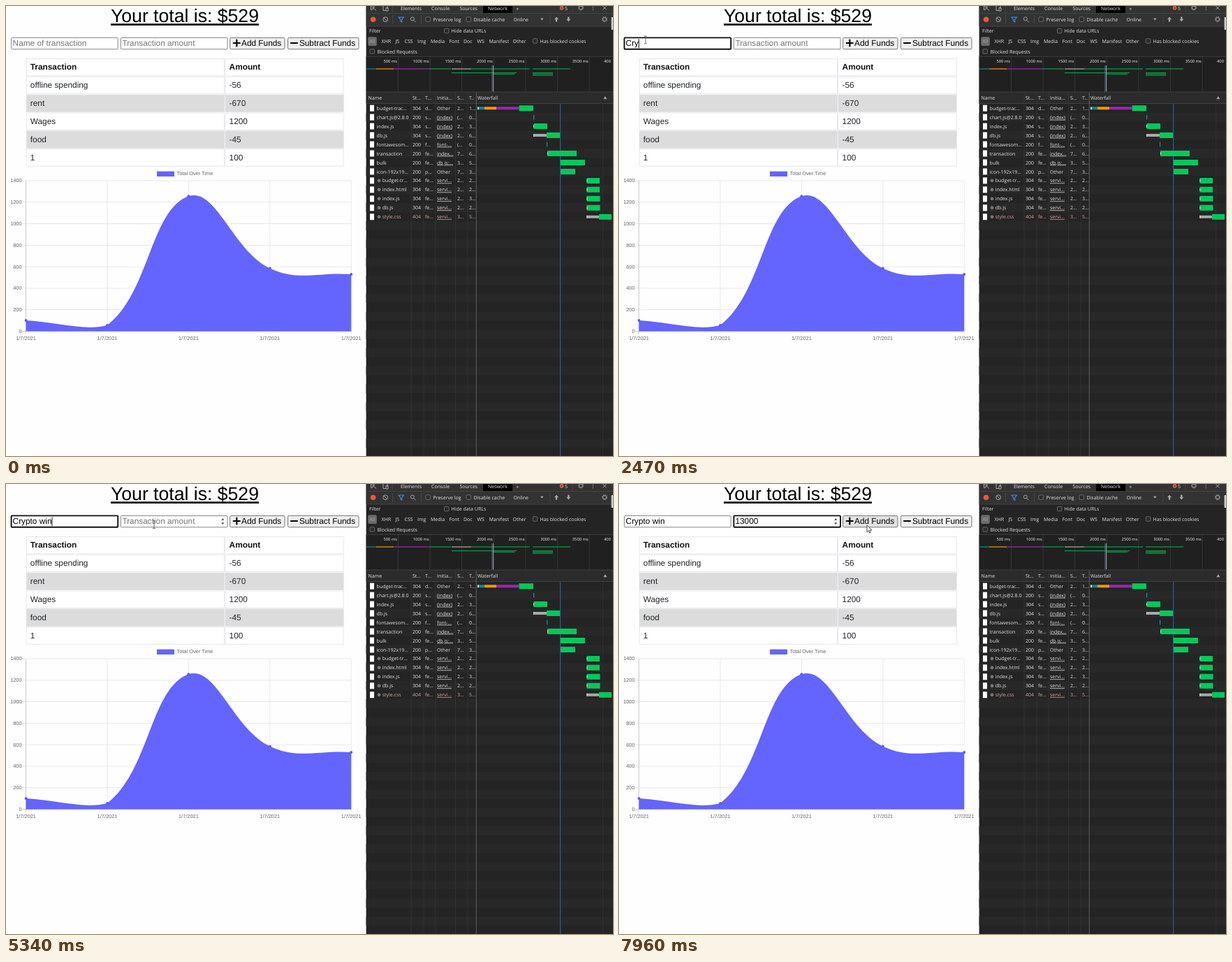
These frames come from a looping animation (869x644 px, 8 s). An HTML page:

```html
<!DOCTYPE html>
<html lang="en">
<head>
<meta charset="utf-8">
<title>Budget tracker</title>
<style>
html, body { margin: 0; width: 100%; height: 100%; overflow: hidden; background: #fefefe; }
svg { display: block; width: 869px; height: 644px; }
text { white-space: pre; text-rendering: geometricPrecision; }
.page { font: 11.84px "Liberation Sans", Arial, sans-serif; fill: #212529; }
.ink { fill: #000; }
.hint { fill: #757575; }
.head { font-weight: bold; fill: #111; }
.title { font-size: 26.6px; fill: #000; text-decoration: underline; }
.chart { font: 7.4px "Liberation Sans", Arial, sans-serif; fill: #666; }
.dev { font: 7px "Open Sans", "Noto Sans", sans-serif; fill: #e2e2e2; }
.scale { font-size: 5.8px; fill: #f0f0f0; }
.link { text-decoration: underline; }
.failed { fill: #e0a39b; }
.end { text-anchor: end; }
.mid { text-anchor: middle; }
.icon { fill: none; stroke: #a5a5a5; stroke-width: 1; }
</style>
</head>
<body>
<svg id="stage" viewBox="0 0 869 644"></svg>
<script>
const stage = document.getElementById('stage');
const rect = (x, y, w, h, fill, more = '') =>
  `<rect x="${x}" y="${y}" width="${w}" height="${h}" fill="${fill}" ${more}/>`;
const text = (x, y, s, cls, more = '') => `<text x="${x}" y="${y}" class="${cls}" ${more}>${s}</text>`;
const path = (d, more = 'class="icon"') => `<path d="${d}" ${more}/>`;
const circle = (x, y, r, more = 'class="icon"') => `<circle cx="${x}" cy="${y}" r="${r}" ${more}/>`;
const vline = (x, y1, y2, color, w = 0.8) => rect(x - w / 2, y1, w, y2 - y1, color);
const hline = (x1, x2, y, color, w = 0.8) => rect(x1, y - w / 2, x2 - x1, w, color);

function form() {
  const field = (id, x, hint) =>
    rect(x, 45.4, 152.6, 16.4, '#fff', `id="${id}Box" rx="1" stroke="#767676"`) +
    text(x + 2, 57.4, hint, 'page hint', `id="${id}Hint"`) +
    text(x + 2, 57.4, '', 'page ink', `id="${id}Text"`);
  const button = (id, x, w, label) =>
    rect(x, 45.4, w, 16.4, '#efefef', `id="${id}" rx="2" stroke="#767676"`) +
    text(x + 16.4, 57.4, label, 'page ink');
  return text(150, 23.2, 'Your total is: $529', 'page title') +
    field('name', 7.6, 'Name of transaction') +
    field('amount', 164.4, 'Transaction amount') +
    path('M308.3 51.7l2-2.6 2 2.6zM308.3 55.3l2 2.6 2-2.6z', 'id="spinner" fill="#444"') +
    button('add', 320.6, 78.4, 'Add Funds') +
    button('subtract', 403.5, 101.5, 'Subtract Funds') +
    path('M325.8 53h9M330.3 48.5v9M408 53h9', 'stroke="#000" stroke-width="2.2" stroke-linecap="round"');
}

function table() {
  const rows = [['Transaction', 'Amount'], ['offline spending', -56], ['rent', -670],
    ['Wages', 1200], ['food', -45], ['1', 100]];
  return rows.map((row, i) => {
    const y = 75.4 + i * 25.88;
    const fill = i === 2 || i === 4 ? '#dcdcdc' : '#fff';
    return row.map((label, col) =>
      rect(col ? 313.9 : 29.2, y, col ? 169.3 : 283.3, 24.4, fill, 'stroke="#dee2e6" stroke-width=".8"') +
      text(col ? 319.6 : 34.8, y + 15.8, label, i ? 'page' : 'page head')).join('');
  }).join('');
}

function chart() {
  const left = 28.6, step = 116.4, base = 465.5, top = 250;
  const toY = v => base - v * (base - top) / 1400;
  const points = [100, 55, 1255, 585, 529].map((v, i) => [left + i * step, toY(v)]);
  let out = rect(216, 236.6, 25, 7.4, '#6464ff') + text(244.5, 242.4, 'Total Over Time', 'chart');
  for (let v = 0; v <= 1400; v += 200) {
    out += hline(23, 494.2, toY(v), v ? '#e3e3e3' : '#bbb') + text(22.6, toY(v) + 2.4, v, 'chart end');
  }
  points.forEach(([x], i) => {
    out += vline(x, top, 469, i ? '#e3e3e3' : '#bbb') + text(x, 478.3, '1/7/2021', 'chart mid');
  });

  // Spline handles follow the neighbours' chord, weighted by distance.
  const dist = (a, b) => Math.hypot(a[0] - b[0], a[1] - b[1]);
  const clamp = y => Math.max(top, Math.min(base, y));
  const handles = points.map((p, i) => {
    const a = points[i - 1] || p, b = points[i + 1] || p;
    const k = 0.4 / (dist(a, p) + dist(p, b));
    const at = f => [p[0] + f * (b[0] - a[0]), clamp(p[1] + f * (b[1] - a[1]))];
    return { before: at(-k * dist(a, p)), after: at(k * dist(p, b)) };
  });
  let d = `M${points[0]}`;
  for (let i = 1; i < points.length; i++) d += `C${handles[i - 1].after} ${handles[i].before} ${points[i]}`;
  out += path(`${d}V${base}H${left}Z`, 'fill="#6464ff"') + path(d, 'fill="none" stroke="#000" stroke-opacity=".08"');
  return out + points.map(([x, y]) => circle(x, y, 2, 'fill="#5c5cf0"')).join('');
}

const checkbox = (x, y) => rect(x, y - 3.2, 6.4, 6.4, '#2a2a2a', 'rx="1" stroke="#858585" stroke-width=".7"');
const gear = (x, y, r) => circle(x, y, r * 0.7) +
  circle(x, y, r, `class="icon" stroke-dasharray="${r * 0.39}"`);

function toolbars() {
  let out = rect(515.6, 0, 353.4, 644, '#242424') + rect(515.6, 0, 353.4, 29, '#333') +
    rect(683, 0, 42, 10.4, '#000') + hline(515.6, 869, 10.4, '#484848') + hline(515.6, 869, 29, '#484848');
  const labels = [[565, 5.5, 'Elements'], [609, 5.5, 'Console'], [649.5, 5.5, 'Sources'], [690, 5.5, 'Network'],
    [730.5, 5.5, '»'], [800, 5.5, '5'], [611.5, 22, 'Preserve log'], [669.5, 22, 'Disable cache'],
    [726.5, 22, 'Online'], [520, 38.4, 'Filter'], [637.5, 38.4, 'Hide data URLs'], [537.5, 53.2, 'XHR'],
    [557.5, 53.2, 'JS'], [570.5, 53.2, 'CSS'], [589, 53.2, 'Img'], [608, 53.2, 'Media'], [634.5, 53.2, 'Font'],
    [655, 53.2, 'Doc'], [674.5, 53.2, 'WS'], [691.5, 53.2, 'Manifest'], [725.5, 53.2, 'Other'],
    [764.5, 53.2, 'Has blocked cookies'], [531.5, 67.8, 'Blocked Requests']];
  out += rect(518.2, 44.2, 12.6, 12.8, '#6b6b6b', 'rx="2"') + text(520.3, 53.2, 'All', 'dev', 'style="fill:#aaa"');
  out += labels.map(([x, y, s]) => text(x, y, s, 'dev')).join('');
  out += [[601, 19], [659, 19], [627.5, 35.5], [754.3, 50], [521, 65]].map(p => checkbox(...p)).join('');
  out += [[553, 0, 9], [811, 0, 9], [553.5, 13, 26], [594.5, 13, 26], [779, 13, 26]]
    .map(([x, a, b]) => vline(x, a, b, '#4d4d4d')).join('');
  out += path('M528 0h-5.5v5.5h2M525 2l5 4.5M525 5V2h3M540 0v6.5h4M546 4V0M544 2.5h3v4.5h-3z') +
    path('M854.5 .2l5 5M859.5 .2l-5 5') + gear(823, 2.5, 3.6) + gear(857, 19, 3.6) +
    [0, 2.7, 5.4].map(y => circle(840.3, y, 0.7, 'fill="#a5a5a5"')).join('') +
    circle(795.6, 2.8, 2.9, 'fill="#e8583e"') + path('M794.5 1.7l2.2 2.2M796.7 1.7l-2.2 2.2', 'stroke="#333" stroke-width=".7"') +
    circle(525.6, 19.2, 3.8, 'fill="#f2553c"') + circle(543.2, 19.2, 3.4) + path('M540.8 16.8l4.8 4.8') +
    path('M562 16h7.4l-2.7 3.4v3.6l-2-1.2v-2.4z', 'fill="none" stroke="#3b8eea" stroke-width="1.1"') +
    circle(581.8, 18.4, 2.5) + path('M583.7 20.3l3 3') +
    path('M765 17.4h4.6l-2.3 3.4z', 'fill="#a5a5a5"') +
    path('M785 19l3-3.6 3 3.6h-1.8v3.6h-2.4V19zM802.3 18.8l3 3.6 3-3.6h-1.8v-3.4h-2.4v3.4z', 'fill="#a5a5a5"');
  return out + rect(866.6, 16, 2.4, 18, '#d0d0d0');
}

function overview() {
  let out = rect(515.6, 72, 353.4, 51, '#202020') + hline(515.6, 869, 72.3, '#444');
  for (let i = 1; i < 8; i++) {
    const x = 515.9 + i * 45.6;
    out += vline(x, 73, 122.5, '#3b3b3b') + text(x - 1.4, 81.2, `${i * 500} ms`, 'dev scale end');
  }
  out += text(856, 81.2, '400', 'dev scale');
  const marks = [[516, 530, 90, '#0b8a93'], [530, 555, 90, '#f29900'], [555, 606, 90, '#9c27b0'],
    [606, 637, 90, '#0c9c45'], [638, 666, 90, '#aaa'], [666, 750, 90, '#0c9c45'], [754, 808, 90, '#0c9c45'],
    [638, 731, 95.6, '#0c9c45'], [697, 728, 97.4, '#0c9c45'], [754, 783, 95.6, '#0c9c45'],
    [754, 783, 97.4, '#0c9c45'], [754, 783, 99.3, '#0c9c45']];
  out += marks.map(([a, b, y, c]) => hline(a, b, y, c, 1.2)).join('');
  return out + vline(695.8, 85, 122.5, '#4b72b8') + vline(697.4, 85, 122.5, '#c9bcbc');
}

function requests() {
  const columns = [518.5, 582, 600, 617, 646, 663, 675];
  const rows = [
    ['budget-trac...', 304, 'd...', 'Other', '2...', '1...'], ['chart.js@2.8.0', 200, 's...', '(index)', '(...', '0...'],
    ['index.js', 304, 's...', '(index)', '2...', '3...'], ['db.js', 304, 's...', '(index)', '2...', '6...'],
    ['fontawesom...', 200, 'f...', 'font-...', '(...', '0...'], ['transaction', 200, 'fe...', 'index...', '7...', '6...'],
    ['bulk', 200, 'fe...', 'db.js:...', '3...', '5...'], ['icon-192x19...', 200, 'p...', 'Other', '7...', '3...'],
    ['budget-tr...', 304, 'fe...', 'servi...', '2...', '2...'], ['index.html', 304, 'fe...', 'servi...', '2...', '2...'],
    ['index.js', 304, 'fe...', 'servi...', '2...', '3...'], ['db.js', 304, 'fe...', 'servi...', '2...', '2...'],
    ['style.css', 404, 'fe...', 'servi...', '3...', '5...']];
  let out = '';
  for (let i = 0; i < 39; i++) if (i % 2) out += rect(515.6, 139.6 + i * 12.96, 353.4, 12.96, '#282828');
  out += rect(515.6, 123, 353.4, 16.6, '#2b2b2b') + hline(515.6, 869, 123, '#484848') + hline(515.6, 869, 139.4, '#484848');
  out += [580, 598, 615, 643.5, 661].map(x => vline(x, 124, 644, '#363636')).join('');
  out += vline(673.2, 124, 644, '#6e6e6e') + vline(854.5, 140, 644, '#323232');
  out += ['Name', 'St...', 'T...', 'Initia...', 'S...', 'T..', 'Waterfall']
    .map((s, i) => text(columns[i], 134.4, s, 'dev')).join('');
  out += path('M855.3 133.3h5l-2.5-4.4z', 'fill="#a5a5a5"');
  rows.forEach((row, i) => {
    const y = 146.2 + i * 12.96, worker = i > 7;
    const tone = row[1] === 404 ? ' failed' : '';
    out += rect(521, y - 4.5, 6, 9, '#fff');
    if (worker) out += circle(534, y, 2, 'class="icon" stroke-dasharray="1 .57"') + circle(534, y, 1.2);
    row.forEach((s, col) => {
      const x = col ? columns[col] : worker ? 538.7 : 530.6;
      out += text(x, y + 2.6, s, 'dev' + tone + (col === 3 && s !== 'Other' ? ' link' : ''));
    });
  });

  const green = '#04c85a', gray = '#a9a9a9';
  const bars = [[0, 675, 677, '#ddd'], [0, 677, 685, '#0b8a93'], [0, 685, 702, '#f29900'], [0, 702, 734.5, '#9c27b0'],
    [0, 734.5, 755, green], [2, 755.5, 775, green], [3, 755, 774, gray], [3, 774, 793, green], [5, 775, 817, green],
    [6, 793.6, 829, green], [7, 794, 815, green], [8, 831.5, 850, green], [9, 831.5, 850, green],
    [10, 831.5, 850.5, green], [11, 831.5, 850.5, green], [12, 831, 849, gray], [12, 849, 867, green]];
  out += vline(793.6, 140, 644, '#2f5596', 1.3);
  bars.forEach(([i, a, b, color]) => {
    const h = color === green ? 8 : 4;
    out += rect(a, 146.2 + i * 12.96 - h / 2, b - a, h, color, 'rx=".6"');
  });
  [[1, 755.6], [4, 774.6]].forEach(([i, x]) => { out += rect(x - 0.6, 142.8 + i * 12.96, 1.2, 6.8, '#1e88c8'); });
  [[2, 755], [3, 755], [5, 775], [8, 831.4], [9, 831.4], [10, 831.4], [11, 831.4], [12, 831.4]]
    .forEach(([i, x]) => { out += rect(x, 144.2 + i * 12.96, 1, 4, '#ddd'); });
  return out;
}

stage.innerHTML = rect(0, 0, 869, 644, '#fefefe') + form() + table() + chart() +
  toolbars() + overview() + requests() +
  rect(0, 47.3, 0.9, 13, '#000', 'id="caret"') +
  path('M0 0V9.7l2.2-2 1.5 3.4 1.6-.7-1.5-3.3h3.1z', 'id="arrow" fill="#fff" stroke="#222" stroke-width=".8"') +
  path('M-2-5.5h1.4l.6.6.6-.6H2M0-5v10M-2 5.5h1.4l.6-.6.6.6H2', 'id="beam" fill="none" stroke="#555" stroke-width=".9"');

const el = id => document.getElementById(id);
const show = (id, on) => { el(id).style.display = on ? '' : 'none'; };

const typing = [
  [990, 'name', ''], [1070, 'name', ''], [1920, 'name', 'C'], [2150, 'name', 'Cr'], [2470, 'name', 'Cry'],
  [2620, 'name', 'Cryp'], [3020, 'name', 'Crypt'], [3090, 'name', 'Crypto'], [3560, 'name', 'Crypto '],
  [3880, 'name', 'Crypto w'], [3950, 'name', 'Crypto wi'], [4030, 'name', 'Crypto win'],
  [5490, 'amount', ''], [6350, 'amount', '1'], [6650, 'amount', '13'], [6960, 'amount', '130'],
  [7110, 'amount', '1300'], [7350, 'amount', '13000']];

// Pointer stops: tick, x, y. The pointer is sampled about 13 times a second.
const pointer = [
  [2, 579, 434], [5, 280, 230], [7, 90, 110], [9, 31, 71], [10, 24, 66], [12, 43, 48], [14, 43, 48], [15, 38, 48.5],
  [56, 38, 48.5], [57, 60, 66], [58, 130, 42], [59, 215, 24], [60, 258, 39], [61, 238, 64], [63, 216, 68],
  [64, 216, 68], [65, 215, 66], [67, 213, 59], [72, 208, 54.5], [88, 208, 54.5], [91, 235, 60], [92, 270, 67],
  [94, 325, 56], [96, 350, 46], [98, 356, 61], [100, 356, 61], [101, 356, 60], [102, 355, 59]];
const TICK = 77.42, FIRST_TICK = 50;

function pointerAt(tick) {
  const next = pointer.findIndex(p => p[0] > tick);
  if (next < 0) return pointer[pointer.length - 1].slice(1);
  const [t0, x0, y0] = pointer[next - 1], [t1, x1, y1] = pointer[next];
  const k = (tick - t0) / (t1 - t0);
  return [x0 + k * (x1 - x0), y0 + k * (y1 - y0)];
}

function drawPointer(tick) {
  const visible = tick >= pointer[0][0];
  const [x, y] = visible ? pointerAt(tick) : [0, 0];
  const inField = y > 45 && y < 62 && ((x > 7 && x < 160.5) || (x > 164 && x < 317.5));
  show('arrow', visible && !inField);
  show('beam', visible && inField);
  el(inField ? 'beam' : 'arrow').setAttribute('transform', `translate(${x} ${y})`);
  show('spinner', tick >= 66);
  el('add').setAttribute('fill', tick >= 94 ? '#e2e2e2' : '#efefef');
}

function drawFields(t) {
  const past = typing.filter(e => e[0] <= t);
  const last = past[past.length - 1];
  for (const id of ['name', 'amount']) {
    const value = past.filter(e => e[1] === id).pop()?.[2] ?? '';
    const focused = last?.[1] === id;
    el(id + 'Text').textContent = value;
    show(id + 'Hint', !value);
    el(id + 'Box').setAttribute('stroke', focused ? '#101010' : '#767676');
    el(id + 'Box').setAttribute('stroke-width', focused ? 1.9 : 0.9);
  }
  show('caret', last && (t - last[0]) % 1060 < 530);
  if (last) {
    const field = el(last[1] + 'Text');
    el('caret').setAttribute('x', +field.getAttribute('x') + (last[2] ? field.getComputedTextLength() : 0.6));
  }
}

const start = performance.now();
function draw() {
  const t = (performance.now() - start) % 8000;
  drawPointer(Math.floor((t - FIRST_TICK) / TICK));
  drawFields(t);
  requestAnimationFrame(draw);
}
draw();
</script>
</body>
</html>
```
